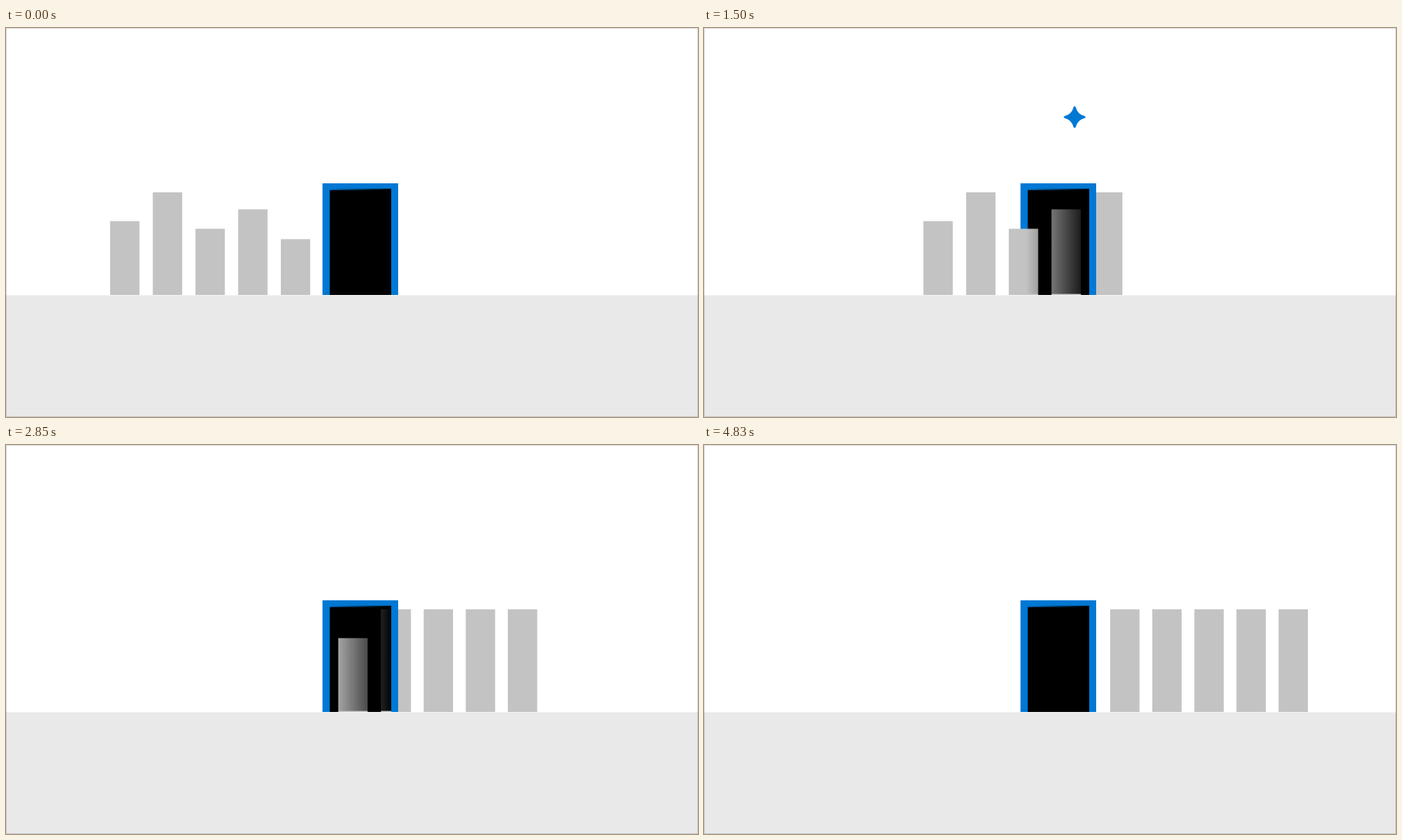
Animation of 997x561 px, one loop 5.07 s. Source, as an HTML page with a canvas:

```html
<!DOCTYPE html>
<html lang="en">
<head>
<meta charset="utf-8">
<title>Bars through a door</title>
<style>
  html, body { margin: 0; width: 100%; height: 100%; overflow: hidden; background: #fff; }
  canvas { display: block; }
</style>
</head>
<body>
<canvas id="stage" width="997" height="561"></canvas>
<script>
const ctx = document.getElementById('stage').getContext('2d');
const LOOP = 5070, STEP = 30, START = 120, END = 3720;
const SPEED = 0.1204; // px per ms
const GROUND = 385, BAR_WIDTH = 42.3;
const BLUE = '#0078d4', GREY = '#c3c3c3';
const barTops = [278.5, 237, 289.5, 261.5, 304.5];

// start time, centre x, centre y
const stars = [
  [930, 500, 155], [1440, 534, 128.5], [1905, 497, 138], [2460, 520, 178], [2970, 525, 155],
  [4140, 494, 187], [4335, 531, 155], [4530, 503, 122.5]
];

const shade = ctx.createLinearGradient(464, 0, 556, 0);
shade.addColorStop(0, 'rgba(0,0,0,0)');
shade.addColorStop(1, '#000');

function box(left, top, right, bottom, fill) {
  ctx.fillStyle = fill;
  ctx.fillRect(left, top, right - left, bottom - top);
}

function bar(x, top) {
  box(x, top, x + BAR_WIDTH, GROUND, GREY);
}

function clipped(left, right, draw) {
  ctx.save();
  ctx.beginPath();
  ctx.rect(left, 0, right - left, 561);
  ctx.clip();
  draw();
  ctx.restore();
}

// Grow with a slight overshoot, hold, then shrink quickly.
function starScale(age) {
  if (age <= 0 || age >= 300) return 0;
  if (age > 210) return (300 - age) / 90;
  const p = Math.min(age / 150, 1) - 1;
  return 1 + 2 * p ** 3 + p ** 2;
}

function star(x, y, scale) {
  if (scale <= 0) return;
  ctx.save();
  ctx.translate(x, y);
  ctx.scale(scale, scale);
  ctx.beginPath();
  ctx.moveTo(0, -15);
  for (const [sx, sy, ex, ey] of [[1, -1, 15, 0], [1, 1, 0, 15], [-1, 1, -15, 0], [-1, -1, 0, -15]]) {
    ctx.quadraticCurveTo(sx * 3, sy * 3, ex, ey);
  }
  ctx.closePath();
  ctx.fillStyle = ctx.strokeStyle = BLUE;
  ctx.lineWidth = 3.6;
  ctx.lineJoin = 'round';
  ctx.fill();
  ctx.stroke();
  ctx.restore();
}

function render(t) {
  const travel = SPEED * (Math.min(Math.max(t, START), END) - START);
  const remaining = SPEED * (END - Math.min(t, END));

  box(0, 0, 997, 561, '#fff');
  box(0, 385.5, 997, 561, '#e9e9e9');

  // Equalised bars leave from behind the door.
  clipped(510, 997, () => {
    for (let i = 0; i < 5; i++) bar(827.8 - i * 60.65 - remaining, 237);
  });

  box(456, 224, 565, GROUND, BLUE);
  box(466.5, 233.7, 555, GROUND, '#000');

  // Uneven bars enter and fade into the dark.
  clipped(0, 555, () => {
    barTops.forEach((top, i) => bar(150 + i * 61.5 + travel, top));
    box(464, 231.8, 555, 383.5, shade);
  });

  for (const [start, x, y] of stars) star(x, y, starScale(t - start));

  ctx.strokeStyle = 'rgba(0,0,0,0.16)';
  ctx.lineWidth = 1;
  ctx.strokeRect(0.5, 0.5, 996, 560);
}

const origin = performance.now();
function tick() {
  const t = (performance.now() - origin) % LOOP;
  render(Math.floor(t / STEP) * STEP);
  requestAnimationFrame(tick);
}
tick();
</script>
</body>
</html>
```
